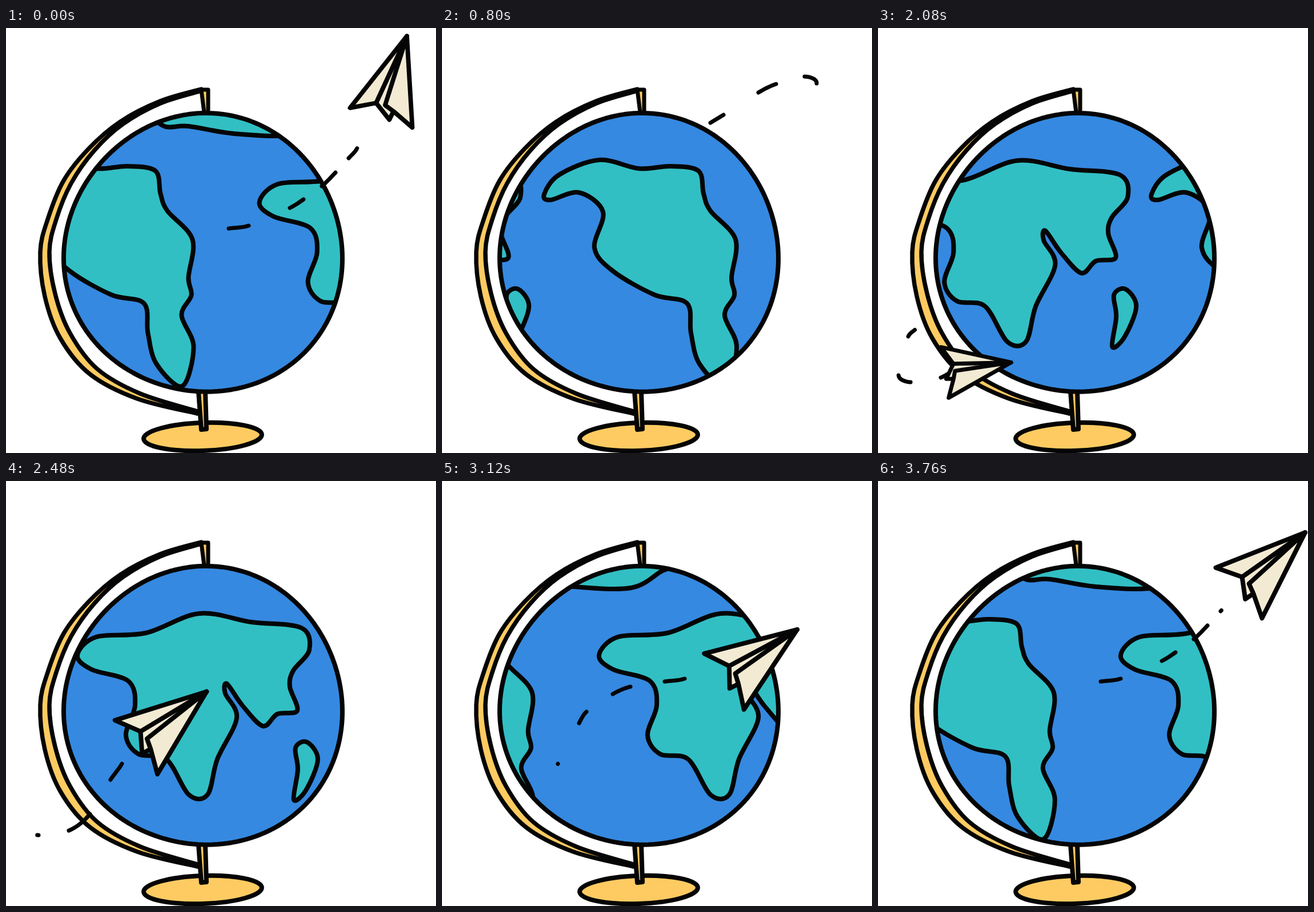
These frames come from a looping animation (753x744 px, 3840 ms). An HTML page with a canvas:

```html
<!DOCTYPE html>
<html lang="en">
<head>
<meta charset="utf-8">
<title>Globe and paper plane</title>
<style>
html, body { margin: 0; width: 100%; height: 100%; overflow: hidden; background: #fff; }
canvas { display: block; width: 753px; height: 744px; }
</style>
</head>
<body>
<canvas id="stage" width="753" height="744"></canvas>
<script>
const ctx = document.getElementById('stage').getContext('2d');
const LOOP = 3840, STEP = 80, MAP_WIDTH = 900, TAU = 2 * Math.PI;
const BLUE = '#3589e0', TEAL = '#31bfc4', YELLOW = '#fecb62', CREAM = '#f2ead2', INK = '#050505';

const rad = degrees => degrees * Math.PI / 180;
const clamp01 = v => Math.min(1, Math.max(0, v));
const pairs = flat => Array.from({ length: flat.length / 2 }, (_, i) => [flat[2 * i], flat[2 * i + 1]]);

// Value on a Hermite curve from a to b with end slopes ma and mb
const hermite = (a, b, ma, mb, u) =>
  a + u * (ma + u * (3 * (b - a) - 2 * ma - mb + u * (ma + mb - 2 * (b - a))));

// Smooth path through points; an open one rests at its ends
function curve(points, closed, path = new Path2D()) {
  const n = points.length;
  const at = i => closed ? points[(i + n) % n] : points[Math.min(n - 1, Math.max(0, i))];
  path.lineTo(...points[0]);
  for (let i = 0; i < (closed ? n : n - 1); i++) {
    const a = at(i - 1), b = at(i), c = at(i + 1), d = at(i + 2);
    path.bezierCurveTo(b[0] + (c[0] - a[0]) / 6, b[1] + (c[1] - a[1]) / 6,
      c[0] - (d[0] - b[0]) / 6, c[1] - (d[1] - b[1]) / 6, c[0], c[1]);
  }
  if (closed) path.closePath();
  return path;
}

const blob = (...flat) => curve(pairs(flat), true);

function polygon(...flat) {
  const path = new Path2D();
  pairs(flat).forEach(p => path.lineTo(...p));
  path.closePath();
  return path;
}

function paint(path, fill, width = 8) {
  ctx.fillStyle = fill;
  ctx.lineWidth = width;
  ctx.fill(path);
  ctx.stroke(path);
}

// A circle with a slight hand-drawn wobble
const globe = polygon(...Array.from({ length: 180 }, (_, i) => {
  const a = i / 180 * TAU;
  const r = 243.8 + 3.5 * Math.cos(a - rad(55)) + 3 * Math.cos(3 * (a + rad(80)));
  return [344.5 + r * Math.cos(a), 392.5 + r * Math.sin(a)];
}).flat());

const americas = blob(179,291, 205,257, 275,231, 345,246, 400,242, 449,250, 458,290, 470,320, 514,370, 507,437,
  512,468, 495,503, 516,558, 496,627, 451,588, 436,534, 429,482, 372,467, 300,426, 267,385, 282,322, 240,288, 190,301);
const oldWorld = blob(125,305, 158,273, 245,266, 338,232, 430,247, 517,257, 531,296, 503,332, 497,360, 510,402,
  475,408, 450,429, 414,393, 387,355, 384,372, 404,415, 370,487, 353,549, 320,549, 281,487, 232,478, 210,445,
  226,393, 214,350, 150,330);
const island = blob(507,467, 527,457, 546,487, 526,540, 504,558, 511,505);
const northCap = blob(255,135, 275,171, 320,172, 400,185, 500,187, 553,158, 585,140, 420,110);
// Shifts place the lands on one wide map
const lands = [[americas, -187.5], [oldWorld, 318.75], [island, 318.75], [northCap, 0]];

const ring = curve(pairs([342,107, 270,128, 200,164, 145,211, 101,267, 73,335, 60,392, 68,470, 95,543, 147,606,
  230,649, 335,675]), false);
curve(pairs([335,671, 235,640, 160,597, 112,534, 86,465, 76,392, 88,335, 114,272, 155,214, 205,168, 270,132,
  342,110]), false, ring);
const base = new Path2D();
base.ellipse(344.5, 715.5, 103.5, 24.5, -.035, 0, TAU);
const topPin = polygon(342,108, 354,108, 354,148, 347,148);
const lowPin = polygon(337,636, 349,636, 351,702, 342,703);

// Plane pointing along +x, with the origin midway between the wing ends
const planeParts = [
  polygon(157,0, 23,-17, 1,15.5, 18,18),
  polygon(157,0, 0,-60, 23,-17),
  polygon(157,0, 24,0, 18,18, 0,60)
];

// time, x, y, heading in degrees; one loop turns the plane once
const flight = [
  [0, 657,157, -72.5], [160, 666,108, -130], [400, 583,97, -202], [800, 390,220, -212], [1440, 143,427, -210],
  [1680, 40,548, -255], [1840, 38,607, -305], [2080, 117,603, -368.6], [2480, 228,466, -398.3],
  [3120, 494,351, -395.4], [3760, 632,196, -402.4]
];

function flightKey(i) {
  const n = flight.length, turn = Math.floor(i / n);
  const [t, x, y, heading] = flight[i - turn * n];
  return [t + turn * LOOP, x, y, heading - turn * 360];
}

function pose(t) {
  const i = flight.filter(key => key[0] <= t).length - 1;
  const [a, b, c, d] = [-1, 0, 1, 2].map(k => flightKey(i + k));
  const span = c[0] - b[0];
  return [1, 2, 3].map(k => hermite(b[k], c[k],
    (c[k] - a[k]) / (c[0] - a[0]) * span, (d[k] - b[k]) / (d[0] - b[0]) * span, (t - b[0]) / span));
}

// The plane is largest in front of the globe and smallest behind it
const planeScale = t => Math.min(1, .8 + .4 * Math.cos((t - 3120) / LOOP * TAU));

function drawPlane(t) {
  const [x, y, heading] = pose(t), scale = planeScale(t);
  ctx.save();
  ctx.translate(x, y);
  ctx.rotate(rad(heading));
  ctx.scale(scale, scale);
  planeParts.forEach(part => paint(part, CREAM, 4 + 4 / scale));
  ctx.restore();
}

// Ends of the dashes along the way: each two points make one dash
const trail = pairs([66,527, 53,540, 36,608, 57,620, 110,612, 147,583, 183,523, 203,495, 240,424, 253,404,
  299,373, 330,360, 390,351, 425,346, 497,315, 521,300, 553,277, 577,253, 600,228, 615,210,
  656,97, 635,85, 585,98, 554,113, 493,152, 470,166]);
const DASHES = trail.length / 2, FIRST_FAR_DASH = 10, DASH_TIME = 90;

function drawDash(i, t) {
  const appear = 1570 + 242.5 * i;
  const vanish = appear + 500 + 330 * Math.sin(Math.PI * i / (DASHES - 1));
  const now = t < appear ? t + LOOP : t;
  const to = clamp01((now - appear) / DASH_TIME), from = clamp01((now - vanish) / DASH_TIME);
  if (to <= from) return;
  const b = trail[2 * i], c = trail[2 * i + 1];
  const a = trail[2 * i - 1] || b, d = trail[2 * i + 2] || c;
  const length = Math.hypot(c[0] - b[0], c[1] - b[1]);
  const slope = (p, q, k) => (q[k] - p[k]) / Math.hypot(q[0] - p[0], q[1] - p[1]) * length;
  ctx.beginPath();
  for (let s = 0; s <= 8; s++) {
    const u = from + (to - from) * s / 8;
    ctx.lineTo(...[0, 1].map(k => hermite(b[k], c[k], slope(a, c, k), slope(b, d, k), u)));
  }
  ctx.lineWidth = 7;
  ctx.stroke();
}

function drawTrail(t, first, end) {
  for (let i = first; i < end; i++) drawDash(i, t);
}

function drawGlobe(t) {
  paint(base, YELLOW);
  paint(topPin, YELLOW, 7);
  paint(ring, YELLOW, 7.5);
  paint(lowPin, YELLOW);
  ctx.fillStyle = BLUE;
  ctx.fill(globe);
  ctx.save();
  ctx.clip(globe);
  for (const [land, shift] of lands) {
    for (const turn of [0, 1]) {
      ctx.save();
      ctx.translate(shift + MAP_WIDTH * (t / LOOP - turn), 0);
      paint(land, TEAL);
      ctx.restore();
    }
  }
  ctx.restore();
  ctx.lineWidth = 8;
  ctx.stroke(globe);
}

function draw(t) {
  const behind = t < 1680;
  ctx.fillStyle = '#fff';
  ctx.fillRect(0, 0, 753, 744);
  ctx.strokeStyle = INK;
  ctx.lineCap = ctx.lineJoin = 'round';
  drawTrail(t, FIRST_FAR_DASH, DASHES);
  if (behind) drawPlane(t);
  drawGlobe(t);
  drawTrail(t, 0, FIRST_FAR_DASH);
  if (!behind) drawPlane(t);
}

const start = performance.now();
function tick() {
  const t = (performance.now() - start) % LOOP;
  draw(Math.floor(t / STEP) * STEP);
  requestAnimationFrame(tick);
}
tick();
</script>
</body>
</html>
```
